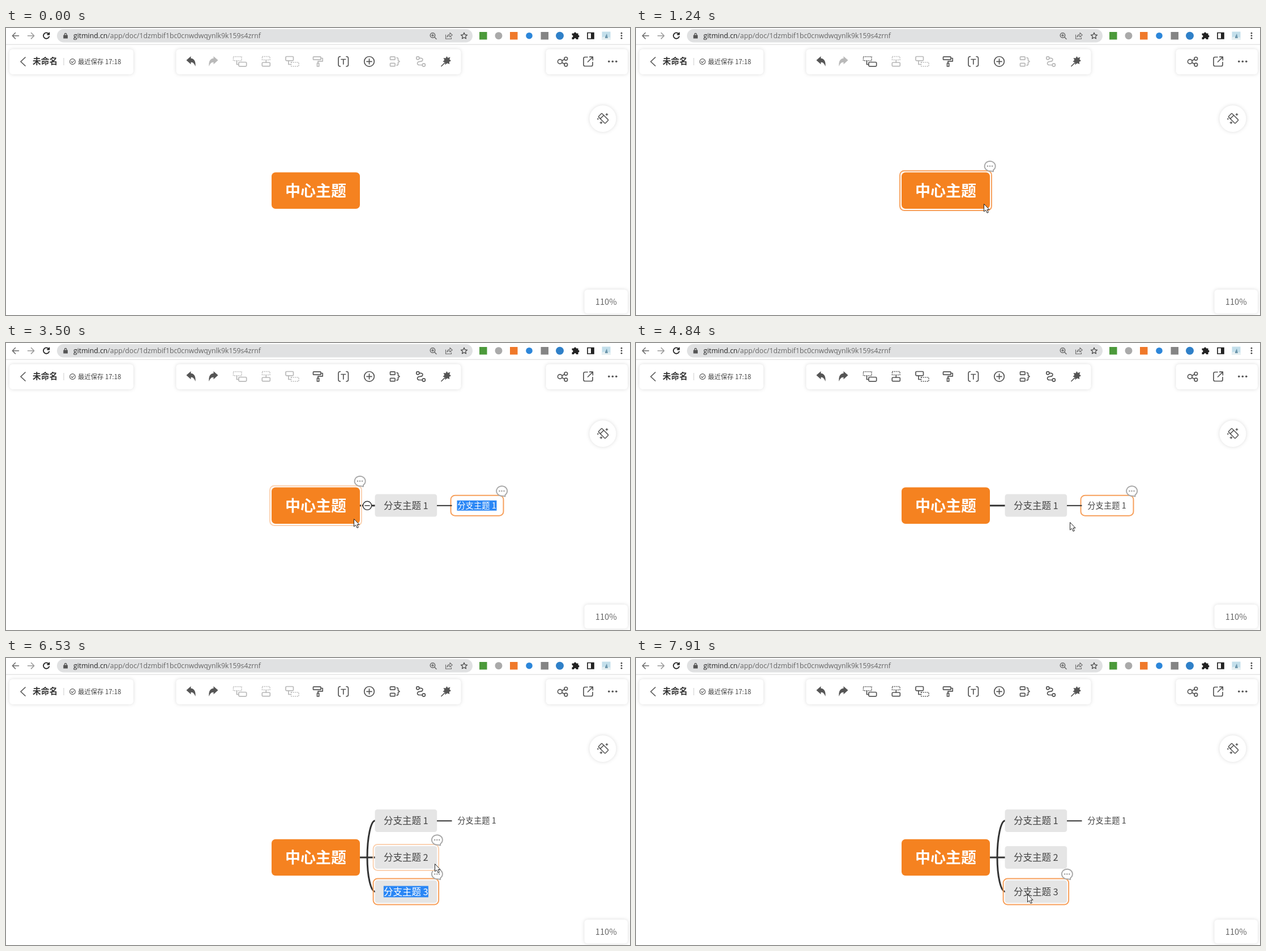
An HTML page that plays this animation: 1102 px wide and 508 px high, repeating every 8000 ms.

```html
<!DOCTYPE html>
<html lang="zh">
<head>
<meta charset="utf-8">
<title>Mind map</title>
<style>
html, body { margin: 0; width: 100%; height: 100%; overflow: hidden; background: #fff; }
svg { display: block; width: 1102px; height: 508px; font-family: "Noto Sans CJK SC", "Noto Sans CJK", sans-serif; }
.panel { fill: #fff; filter: drop-shadow(0 0 3px rgba(0,0,0,.14)); }
.line { fill: none; stroke: currentColor; stroke-width: 1.7; stroke-linecap: round; stroke-linejoin: round; }
.dash { stroke-dasharray: 2 1.6; stroke-linecap: butt; stroke-width: 1.5; }
.solid { fill: currentColor; }
.edge { fill: none; stroke: #333; }
.tool { color: #555; }
.tool.off { color: #b9b9b9; }
</style>
</head>
<body>
<svg viewBox="0 0 1102 508">
  <rect width="1102" height="508" fill="#fff"/>

  <!-- browser bar -->
  <rect y="28.7" width="1102" height="1" fill="#d8d8d8"/>
  <rect x="90" y="2" width="734" height="23.5" rx="11.75" fill="#e0e1e2"/>
  <g class="line" style="stroke-width:1.5" color="#6a6a6a">
    <path d="M22.5 13.7H11.5M16.5 8.5L11.3 13.7L16.5 18.9"/>
    <path d="M38.5 13.7H49.5M44.5 8.5L49.7 13.7L44.5 18.9" color="#999"/>
    <path d="M75.5 10.5A5.2 5.2 0 1 0 76.2 15.2M76.4 8.3V11.5H73" color="#222" stroke-width="1.8"/>
    <circle cx="753.5" cy="13" r="4.2"/><path d="M756.8 16.3L760 19.5M751.7 13H755.3M753.5 11.2V14.8"/>
    <path d="M776.5 12V19.2H786.5V17M778.8 16C779.5 12.5 781.5 11.2 784 11.2V8.5L788.2 12.3L784 16V13.5C782 13.5 780.5 14 778.8 16Z" stroke-width="1.1"/>
    <path d="M809 8.2L810.6 11.9L814.6 12.3L811.6 14.9L812.5 18.8L809 16.7L805.5 18.8L806.4 14.9L803.4 12.3L807.4 11.9Z" stroke-width="1.2" color="#444"/>
  </g>
  <path d="M101.3 12.5H109V18.5H101.3ZM102.8 12.5V11A2.3 2.3 0 0 1 107.5 11V12.5H106.3V11A1.2 1.2 0 0 0 104 11V12.5Z" fill="#555"/>
  <text x="119" y="18" font-size="12.28" fill="#666" style="font-family:'Open Sans',sans-serif"><tspan fill="#222">gitmind.cn</tspan>/app/doc/1dzmbif1bc0cnwdwqynlk9k159s4zrnf</text>
  <rect x="836" y="7" width="13.5" height="13.5" fill="#4c9a3b"/>
  <circle cx="870" cy="13.7" r="6.5" fill="#aaa"/>
  <rect x="890" y="7" width="13.5" height="13.5" fill="#f0792a"/>
  <circle cx="924" cy="13.7" r="5.8" fill="#2c86da"/>
  <rect x="944.5" y="7" width="13.5" height="13.5" fill="#858585"/>
  <circle cx="978" cy="13.7" r="7" fill="#2f80c8"/>
  <path d="M999.5 9.5H1003A2 2 0 1 1 1007 9.5H1010.5V12.5A2 2 0 1 1 1010.5 16.5V20H1007A2 2 0 0 0 1003 20H999.5V16.5A2 2 0 0 0 999.5 12.5Z" fill="#222"/>
  <path d="M1027 8.5H1038V19H1027Z" fill="none" stroke="#222" stroke-width="1.7"/><path d="M1033 8.5H1038V19H1033Z" fill="#222"/>
  <rect x="1052.5" y="6.5" width="15" height="14.5" fill="#c3dfeb"/>
  <path d="M1052.5 17C1057 14 1062 16 1067.5 17V21H1052.5Z" fill="#e6eff1"/>
  <path d="M1058 16L1061 10L1063 18H1058Z" fill="#6e97ac"/>
  <g fill="#444"><circle cx="1087" cy="9.2" r="1.4"/><circle cx="1087" cy="13.7" r="1.4"/><circle cx="1087" cy="18.2" r="1.4"/></g>

  <!-- panels -->
  <rect class="panel" x="6" y="37.5" width="219" height="44.5" rx="6"/>
  <rect class="panel" x="300.5" y="37.5" width="503" height="44.5" rx="6"/>
  <rect class="panel" x="953.5" y="37.5" width="144.5" height="44.5" rx="6"/>
  <rect class="panel" x="1021.5" y="463" width="76.5" height="42.5" rx="6"/>
  <circle class="panel" cx="1054" cy="160.5" r="23.5"/>

  <path class="line" d="M34 52L26 59.5L34 67" color="#555"/>
  <text x="47" y="64" font-size="14.7" font-weight="700" fill="#333">未命名</text>
  <path d="M102 53V66" stroke="#ccc"/>
  <g class="line" style="stroke-width:1.1" color="#555"><circle cx="117.5" cy="59.5" r="4.9"/><path d="M115.2 59.5L117 61.3L120 58"/></g>
  <text x="127" y="63.5" font-size="11.35" fill="#444">最近保存 17:18</text>
  <text x="1059.8" y="489.6" font-size="14.7" fill="#666" text-anchor="middle">110%</text>

  <!-- toolbar -->
  <g class="tool solid"><path id="arrow" d="M318.5 57L326.5 50V53.8C332 54 335.5 59 334.5 68C332.5 63 330.5 60.8 326.5 60.6V64.3Z"/></g>
  <g class="tool solid" id="redo"><use href="#arrow" transform="translate(693 0) scale(-1 1)"/></g>
  <g class="tool line" id="child">
    <path class="dash" d="M401.5 50.8H416V57.8H401.5Z"/><path d="M407.5 58V64.5H410.5"/>
    <rect x="411" y="60.5" width="13.7" height="7.3" rx="1.5"/>
  </g>
  <g class="tool line" id="sibling">
    <path class="dash" d="M452.5 50.5H466V56.5H452.5Z"/><path d="M459.3 57V61"/>
    <rect x="452.3" y="61" width="14" height="6.7" rx="1.5"/>
  </g>
  <g class="tool line" id="parent">
    <rect x="494" y="50.5" width="13.5" height="7.3" rx="1.5"/><path d="M499 58V64.5H502.5"/>
    <path class="dash" d="M503.5 60.8H517V67.8H503.5Z"/>
  </g>
  <g class="tool line" id="brush">
    <rect x="542.5" y="50.8" width="13.5" height="5.4" rx="1"/><path d="M556 53.5H559.2V58.8H551V62"/>
    <rect x="549.5" y="62.3" width="3.2" height="5.7"/>
  </g>
  <g class="tool line">
    <path d="M590.5 50.5Q587 50.5 587 54V64.5Q587 68 590.5 68M601 50.5Q604.5 50.5 604.5 54V64.5Q604.5 68 601 68M592 55.5H599.6M595.8 55.5V64"/>
    <circle cx="641.5" cy="59.3" r="8.8"/><path d="M637 59.3H646M641.5 54.8V63.8"/>
  </g>
  <g class="tool line" id="summary">
    <rect x="678.5" y="50.8" width="8.5" height="5.4" rx="1"/><rect x="678.5" y="62.3" width="8.5" height="5.4" rx="1"/>
    <path d="M690 52.5Q692.5 52.5 692.5 55V57.5L695 59.3L692.5 61V63.7Q692.5 66 690 66"/>
  </g>
  <g class="tool line" id="relation">
    <circle cx="727.3" cy="53.3" r="2.6"/><circle cx="737.8" cy="65.5" r="2.6"/>
    <path d="M730 53.3H733Q737 54 735.5 57.5Q734.5 59.3 731 59.3Q726.5 59.5 726.5 62.8Q727 65.5 730 65.5H735"/>
  </g>
  <g class="tool">
    <path class="solid" d="M778.5 50L780.3 53L784.5 51.5L783.2 55.5L786 58L782.8 59.8L783.2 64L779.3 62.3L775.5 65.2L775.3 61L771.5 59.5L774.3 56.8L772.5 53L776.3 53.5Z"/>
    <path class="line" d="M774.5 62L769 67.5"/>
  </g>

  <!-- right side tools -->
  <g class="tool line">
    <circle cx="978.3" cy="59.5" r="3.9"/><circle cx="988.8" cy="54.3" r="2.8"/><circle cx="988.8" cy="65" r="2.8"/><path d="M982 57.7L986.2 55.5M982 61.5L986.2 63.6"/>
    <path d="M1027 51.5H1022.5Q1020 51.5 1020 54V65Q1020 67.5 1022.5 67.5H1033.5Q1036 67.5 1036 65V60.5M1027.5 60L1036 51.5M1030.8 51.2H1036.3V56.7"/>
    <g class="solid" stroke="none"><circle cx="1064.8" cy="59.3" r="1.8"/><circle cx="1071.3" cy="59.3" r="1.8"/><circle cx="1077.8" cy="59.3" r="1.8"/></g>
    <g transform="rotate(45 1055 160)" stroke-width="1.5"><rect x="1046.5" y="155.7" width="17" height="8.6" rx="1.2"/><path d="M1051.5 156V164"/></g>
    <g class="solid" stroke="none"><path id="spark" d="M1061 150L1061.9 152.2L1064 153L1061.9 153.9L1061 156L1060.1 153.9L1058 153L1060.1 152.2Z"/><use href="#spark" x="-10" y="14.5"/><circle cx="1045.3" cy="161" r="1.2"/></g>
  </g>

  <g id="map"></g>
  <path id="cursor" d="M.5 .5V14L3.6 11.2L6 16.3L8.3 15.3L6 10.4H10Z" fill="#fff" stroke="#222" stroke-width="1" stroke-linejoin="round"/>
</svg>

<script>
const LOOP = 8000, STEP = 70;
const $ = id => document.getElementById(id);

// Pointer runs: [time, x, y]; the pointer rests between runs.
const runs = [
  [[70, 1028, 498], [350, 830, 408], [630, 632, 312], [770, 586, 290], [830, 579, 287]],
  [[900, 589, 290]],
  [[1100, 597, 303], [1170, 608, 309], [1240, 614, 311]],
  [[4630, 640, 313], [4770, 738, 318], [4840, 766, 317], [4910, 764, 310], [5050, 742, 294],
   [5190, 742, 298], [5330, 751, 344], [5390, 752, 352]],
  [[6260, 754, 356], [6400, 757, 364]],
  [[6880, 705, 366], [6950, 659, 366]],
  [[7210, 678, 369], [7420, 740, 314], [7560, 766, 326], [7700, 735, 383], [7840, 696, 415], [7910, 691, 418]]
];

function pointer(t) {
  const run = runs.filter(r => r[0][0] <= t).pop();
  if (!run) return null;
  const start = run[0][0], end = run[run.length - 1];
  if (t >= end[0]) return [end[1], end[2]];
  const q = start + Math.floor((t - start) / STEP) * STEP;
  const i = run.findIndex(p => p[0] > q);
  const a = run[i - 1], b = run[i], k = (q - a[0]) / (b[0] - a[0]);
  return [a[1] + (b[1] - a[1]) * k, a[2] + (b[2] - a[2]) * k];
}

const within = (t, ...spans) => spans.some(([a, b]) => t >= a && t < b);

const box = (x, y, w, h, rx, attrs) =>
  `<rect x="${x}" y="${y}" width="${w}" height="${h}" rx="${rx}" ${attrs}/>`;
const label = (x, y, size, fill, text, weight = 400) =>
  `<text x="${x}" y="${y + size * .38}" font-size="${size}" font-weight="${weight}" fill="${fill}" text-anchor="middle">${text}</text>`;
const edge = (d, w = 3) => `<path class="edge" d="${d}" stroke-width="${w}"/>`;
const toggle = (x, y, r) =>
  `<circle cx="${x}" cy="${y}" r="${r}" fill="#fff" stroke="#333" stroke-width="1.4"/><path d="M${x - r + 3} ${y}H${x + r - 3}" stroke="#333" stroke-width="1.4"/>`;

function bubble(x, y) {
  const dots = [-4, 0, 4].map(d => `<circle cx="${x + d}" cy="${y}" r="1.2" fill="#999"/>`).join('');
  return `<path d="M${x + 6} ${y + 6.8}A9.5 8.7 0 1 0 ${x + 1} ${y + 8.6}L${x + 6} ${y + 9.5}Z" fill="#fff" stroke="#a8a8a8" stroke-width="1.9" stroke-linejoin="round"/>${dots}`;
}

function layout(t) {
  const rootY = t < 5460 ? 287.8 : t < 6530 ? 320.3 : 353;
  const nodes = [{ id: 'root', x: 469, y: rootY, w: 156, h: 64.5 }];
  const branch = (n, y) => nodes.push({ id: 'b' + n, n, x: 651.5, y, w: 109.7, h: 40 });
  if (t >= 1840) branch(1, t < 5460 ? 287.5 : 288);
  if (t >= 3500) nodes.push({ id: 'leaf', x: 787, y: 287.7, w: 90, h: 33 });
  if (t >= 5460) branch(2, t < 6530 ? 352.5 : 353);
  if (t >= 6530) branch(3, 413.5);
  return nodes;
}

const selectedAt = t =>
  t < 770 ? '' : t < 1840 ? 'root' : t < 3500 ? 'b1' : t < 5120 ? 'leaf' :
  t < 5460 ? 'b1' : t < 6530 ? 'b2' : 'b3';

// Root trunk, then a quarter ellipse to each branch.
function edges(nodes) {
  const root = nodes[0], kids = nodes.filter(n => n.n);
  if (!kids.length) return '';
  return edge(`M625 ${root.y}H638`) + kids.map(k => {
    const ry = Math.abs(k.y - root.y);
    return edge(ry < 1 ? `M638 ${root.y}H652`
      : `M638 ${root.y}A14 ${ry} 0 0 ${k.y < root.y ? 1 : 0} 652 ${k.y}`);
  }).join('');
}

function drawNode(n, picked, hover, editing, hasKids) {
  const leaf = n.id === 'leaf', on = picked || hover;
  const cx = n.x + n.w / 2, top = n.y - n.h / 2;
  let out = '';
  if (on) {
    const g = leaf ? 1.5 : 2.9;
    out += box(n.x - g, top - g, n.w + g * 2, n.h + g * 2, 7.5,
      `fill="${leaf ? '#fff' : 'none'}" stroke="${picked ? '#f7a05c' : '#fbd2b2'}" stroke-width="2"`);
  }
  if (n.id === 'root') {
    out += box(n.x, top, n.w, n.h, 7, 'fill="#f58220"') + label(547, n.y, 27, '#fff', '中心主题', 700);
    if (hover && hasKids) out += toggle(638, n.y, 7.6);
  } else {
    const tx = leaf ? 831.5 : cx, tw = leaf ? 70 : 79, th = leaf ? 18 : 20;
    if (!leaf) out += box(n.x, top, n.w, n.h, 4.5, 'fill="#e5e5e5"');
    if (editing) out += box(tx - tw / 2, n.y - th / 2, tw, th, 0, 'fill="#2b87f5"');
    out += label(tx, n.y, leaf ? 14.3 : 16.5, editing ? '#fff' : '#444', `分支主题 ${n.n || 1}`);
  }
  if (hasKids && n.n) out += edge(`M761 ${n.y + .3}H787.5`, 2) + (hover ? toggle(774, n.y, 6.5) : '');
  if (on) out += leaf ? bubble(875.5, 262) : bubble(n.x + n.w, top - 11);
  return out;
}

function tools(t, idle) {
  const state = {
    redo: t >= 1840,
    child: t >= 770 && idle,
    sibling: t >= 1840 && idle,
    parent: t >= 1840 && idle,
    brush: t >= 770,
    summary: t >= 1840,
    relation: t >= 2040
  };
  for (const id in state) $(id).classList.toggle('off', !state[id]);
}

let last = '';
function render(t) {
  const nodes = layout(t), p = pointer(t), picked = selectedAt(t);
  const editing = within(t, [1840, 4430], [5460, 6060], [6530, 7560]);
  const over = n => p && p[0] > n.x && p[0] < n.x + n.w && Math.abs(p[1] - n.y) < n.h / 2;
  const childOf = { root: 'b1', b1: 'leaf' };

  // Parents go on top so that their edges overlap the child outlines.
  const parts = nodes.map(n => {
    const sel = n.id === picked;
    return drawNode(n, sel, over(n), sel && editing, nodes.some(c => c.id === childOf[n.id]));
  });
  const out = edges(nodes) + parts.reverse().join('');
  if (out !== last) $('map').innerHTML = last = out;

  tools(t, !editing);
  $('cursor').style.display = p ? '' : 'none';
  if (p) $('cursor').setAttribute('transform', `translate(${p[0]} ${p[1]})`);
}

const begin = performance.now();
function tick() {
  render((performance.now() - begin) % LOOP);
  requestAnimationFrame(tick);
}
tick();
</script>
</body>
</html>
```
